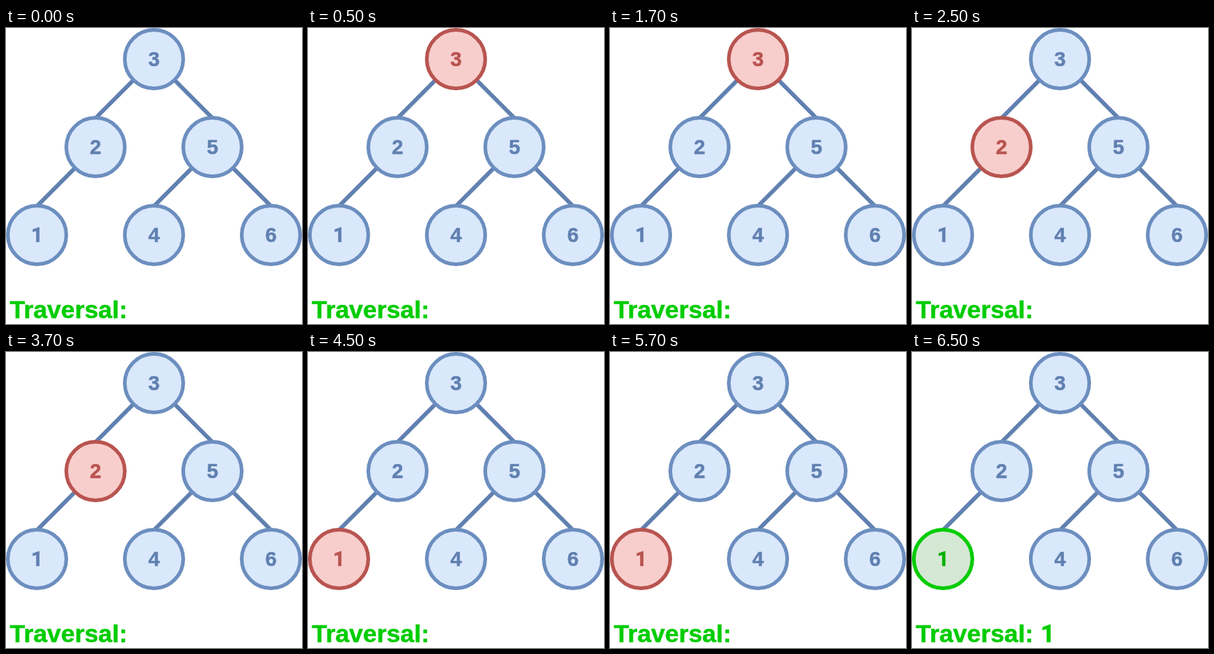
Write an HTML page that moves like this. It is 405x404 px and loops after 8 s.

```html
<!DOCTYPE html>
<html lang="en">
<head>
<meta charset="utf-8">
<title>Tree traversal</title>
<style>
  html, body { margin: 0; width: 100%; height: 100%; overflow: hidden; background: #fff; }
  svg { display: block; width: 405px; height: 404px; }
  text { font-family: Arial, "Liberation Sans", sans-serif; font-weight: 700; stroke-width: 0.5; }
  .one { font-family: Roboto, Arial, sans-serif; }
  .edge { stroke: #6080b0; stroke-width: 5.5; fill: none; }
  .node { stroke-width: 5; }
  .node text { font-size: 28px; text-anchor: middle; fill: currentColor; stroke: currentColor; }
  .label { font-size: 34px; fill: #00cc00; stroke: #00cc00; }
</style>
</head>
<body>
<svg id="stage" viewBox="0 0 405 404">
  <g id="edges"></g>
  <g id="nodes"></g>
  <text class="label" x="5.3" y="395.7">Traversal:</text>
  <text class="label one" id="visited" x="176" y="395.7">1</text>
</svg>
<script>
const LOOP = 8000;
const R = 40;

const looks = {
  idle:   { fill: '#dae8fc', stroke: '#6c8ebf', color: '#6080b0' },
  active: { fill: '#f8cecc', stroke: '#b85450', color: '#b85450' },
  done:   { fill: '#d5e8d4', stroke: '#00cc00', color: '#00b000' }
};

// key: [x, y, parent key]
const tree = {
  3: [202.5, 42.5],
  2: [122.5, 162.5, 3],
  5: [282.5, 162.5, 3],
  1: [42.5, 282.5, 2],
  4: [202.5, 282.5, 5],
  6: [362.5, 282.5, 5]
};

// [time, key, look]
const steps = [
  [500, 3, 'active'],
  [2500, 3, 'idle'],
  [2500, 2, 'active'],
  [4500, 2, 'idle'],
  [4500, 1, 'active'],
  [6500, 1, 'done']
];

function add(parent, tag, attrs) {
  const el = document.createElementNS('http://www.w3.org/2000/svg', tag);
  for (const name in attrs) el.setAttribute(name, attrs[name]);
  return parent.appendChild(el);
}

// Holds each state until the next one begins.
function hold(el, states) {
  const frames = states.map(([time, look]) => ({ ...look, offset: time / LOOP, easing: 'steps(1, end)' }));
  frames.push({ ...states[states.length - 1][1], offset: 1 });
  el.animate(frames, { duration: LOOP, iterations: Infinity });
}

function addEdge([x, y, parent]) {
  const [px, py] = tree[parent];
  const d = R * Math.SQRT1_2;
  const side = Math.sign(x - px);
  add(edges, 'line', { class: 'edge', x1: px + side * d, y1: py + d + 0.5, x2: x, y2: y - R + 0.5 });
}

function addNode(key, [x, y]) {
  const g = add(nodes, 'g', { class: 'node' });
  add(g, 'circle', { cx: x, cy: y, r: R });
  const label = add(g, 'text', { x, y: y + 9.5 });
  label.textContent = key;
  if (key === '1') label.setAttribute('class', 'one');
  Object.assign(g.style, looks.idle);
  const own = steps.filter(s => s[1] === +key).map(s => [s[0], looks[s[2]]]);
  if (own.length) hold(g, [[0, looks.idle], ...own]);
}

const edges = document.getElementById('edges');
const nodes = document.getElementById('nodes');
for (const key in tree) {
  if (tree[key][2]) addEdge(tree[key]);
  addNode(key, tree[key]);
}
hold(document.getElementById('visited'), [[0, { opacity: 0 }], [6500, { opacity: 1 }]]);
</script>
</body>
</html>
```
